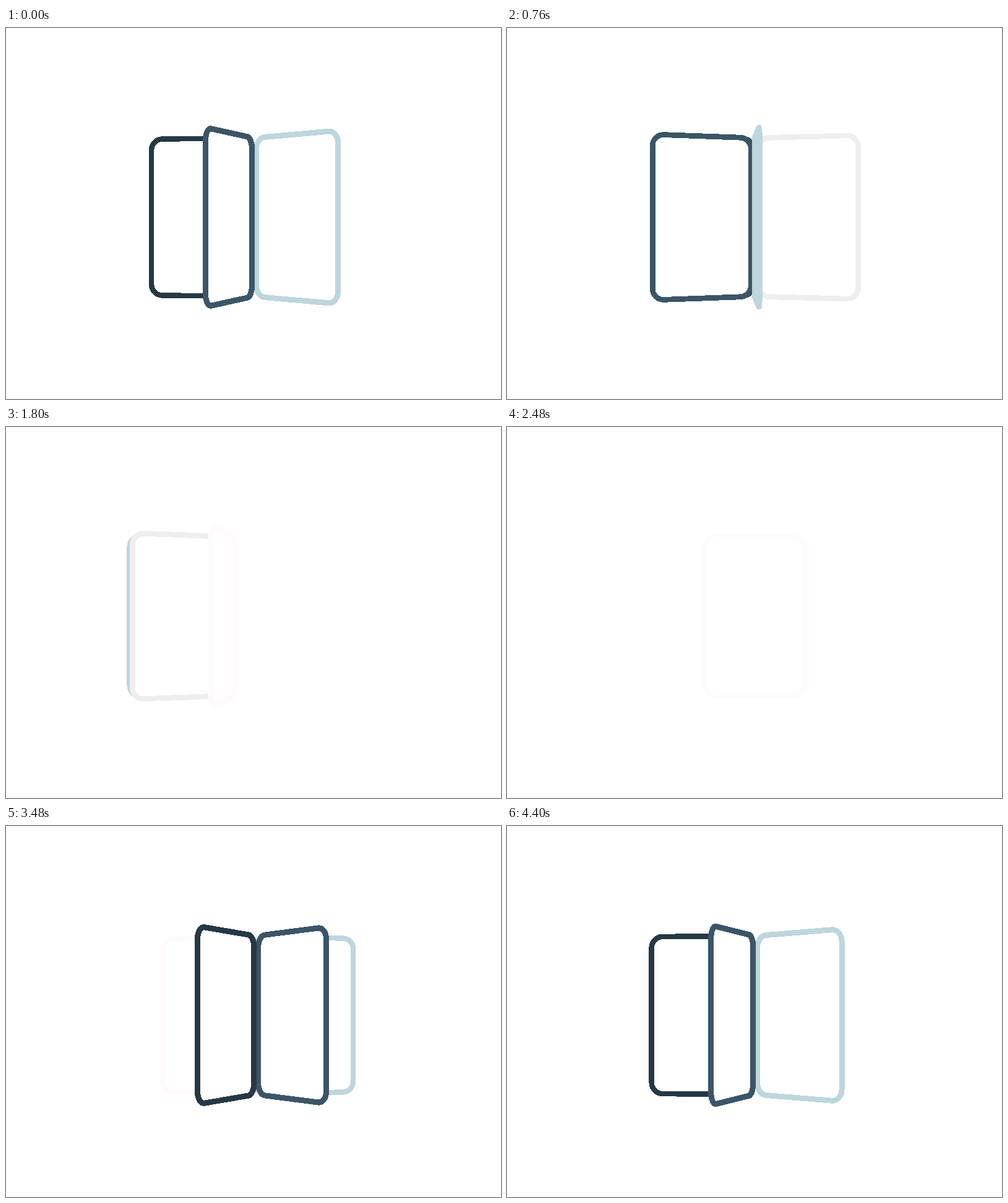
These frames come from a looping animation (800 px wide and 600 px high, 4440 ms). An HTML page:

```html
<!DOCTYPE html>
<html lang="en">
<head>
<meta charset="utf-8">
<title>Turning pages</title>
<style>
html, body { margin: 0; width: 100%; height: 100%; overflow: hidden; background: #fff; }
svg { display: block; width: 100%; height: 100%; }
</style>
</head>
<body>
<svg id="stage" viewBox="0 0 800 600" fill="#fff" stroke-linejoin="round" shape-rendering="crispEdges"></svg>
<script>
const LOOP = 4440, STEP = 40, MIDDLE = 200;
const PERSPECTIVE = 1300, MID_X = 400, MID_Y = 306;
const INNER = 6, OUTER = 168, HALF = 128, RADIUS = 18, STROKE = 8.6;
const SHIFT = 87, SWAY = 68;         // spine travel and its overshoot
const SPREAD = 72, SPEED = 0.06;     // degrees between pages, degrees per ms
const COLORS = ['#fffafb', '#253944', '#3b5567', '#bdd6dc', '#eeeeee'];

// The closing is the opening mirrored in space and time, only slower.
// "flat" is the distance from the middle of the loop; windows are [delay, length] in ms.
const OPENING = { flat: 1900, spine: [0, 820], cover: [20, 585], rest: [246, 585] };
const CLOSING = { flat: 2240, spine: [0, 1120], cover: [110, 1120], rest: [400, 800] };

const progress = (time, [delay, length]) => Math.min(1, Math.max(0, (time - delay) / length));
const smooth = p => p * p * (3 - 2 * p);

// Spine position and page angles (0 flat right, 180 flat left), "before" ms ahead of the middle.
function openingPose(before, phase) {
  const time = phase.flat - before;
  const p = progress(time, phase.spine);
  return {
    spine: MID_X - SHIFT * (1 - smooth(p)) + SWAY * Math.sin(Math.PI * p) ** 2,
    angles: COLORS.map((_, k) => {
      const steady = 270 - SPREAD * k - SPEED * before;
      return steady * smooth(progress(time, k ? phase.rest : phase.cover));
    })
  };
}

function poseAt(fromMiddle) {
  if (fromMiddle < 0) return openingPose(-fromMiddle, OPENING);
  const { spine, angles } = openingPose(fromMiddle, CLOSING);
  const count = angles.length;
  return {
    spine: 2 * MID_X - spine,
    angles: angles.map((_, k) => 180 - angles[(count - k) % count])
  };
}

function pagePath(spine, angle) {
  const cos = Math.cos(angle), sin = Math.sin(angle);
  const point = (x, y) => {
    const scale = PERSPECTIVE / (PERSPECTIVE - x * sin);
    return (MID_X + (spine - MID_X + x * cos) * scale).toFixed(2) + ' ' + (MID_Y + y * scale).toFixed(2);
  };
  const k = RADIUS * 0.448;
  // One rounded corner, walked clockwise; sx and sy give its side.
  const corner = (x, y, sx, sy) => {
    const ends = [[[x - sx * RADIUS, y], [x - sx * k, y]], [[x, y - sy * RADIUS], [x, y - sy * k]]];
    if (sx === sy) ends.reverse();
    const [[from, c1], [to, c2]] = ends;
    return `${point(...from)}C${point(...c1)} ${point(...c2)} ${point(...to)}`;
  };
  return 'M' + [
    corner(INNER, -HALF, -1, -1), corner(OUTER, -HALF, 1, -1),
    corner(OUTER, HALF, 1, 1), corner(INNER, HALF, -1, 1)
  ].join('L') + 'Z';
}

const stage = document.getElementById('stage');
const shapes = COLORS.map(() =>
  stage.appendChild(document.createElementNS('http://www.w3.org/2000/svg', 'path')));

function draw(ms) {
  const time = Math.floor((ms % LOOP) / STEP) * STEP;
  const half = LOOP / 2;
  const { spine, angles } = poseAt((time - MIDDLE + half) % LOOP - half);
  angles
    .map((degrees, k) => {
      const angle = degrees * Math.PI / 180;
      return { angle, color: COLORS[k], depth: Math.sin(angle) - k * 1e-6 };
    })
    .sort((a, b) => a.depth - b.depth)
    .forEach(({ angle, color }, i) => {
      const scale = PERSPECTIVE / (PERSPECTIVE - OUTER * Math.sin(angle));
      shapes[i].setAttribute('d', pagePath(spine, angle));
      shapes[i].setAttribute('stroke', color);
      shapes[i].setAttribute('stroke-width', STROKE * (1 + scale) / 2);
    });
}

const begin = performance.now();
function tick() {
  draw(performance.now() - begin);
  requestAnimationFrame(tick);
}
draw(0);
requestAnimationFrame(tick);
</script>
</body>
</html>
```
